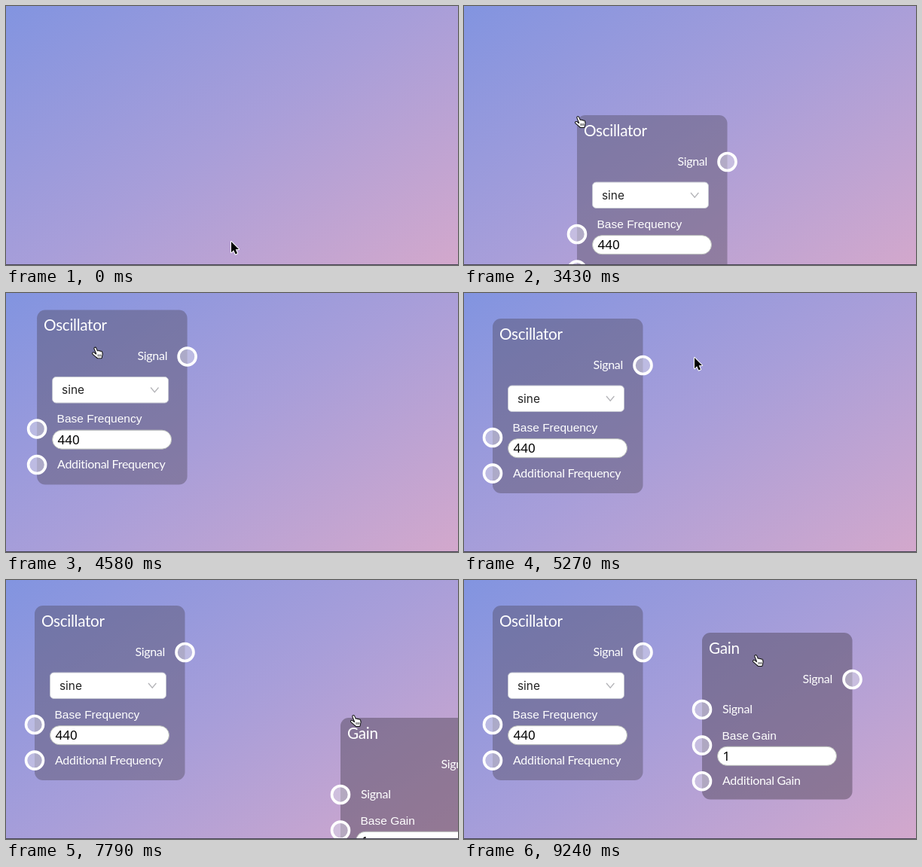
Animation, 600 px wide and 344 px high, one loop 9.39 s. Source, as an HTML page with a canvas:

```html
<!DOCTYPE html>
<html lang="en">
<head>
<meta charset="utf-8">
<title>Node editor</title>
<style>
html, body { margin: 0; width: 100%; height: 100%; overflow: hidden; }
canvas { display: block; width: 600px; height: 344px; }
</style>
</head>
<body>
<canvas id="stage"></canvas>
<script>
const W = 600, H = 344, LOOP = 9390;
const canvas = document.getElementById('stage');
const ctx = canvas.getContext('2d');
const dpr = window.devicePixelRatio || 1;
canvas.width = W * dpr;
canvas.height = H * dpr;

const ROUND = 'Lato, sans-serif';
const PLAIN = '"Liberation Sans", Arial, sans-serif';
const FIELD = '"Noto Sans", sans-serif';
const UI = 'Inter, sans-serif';
const ROW = 24, HEAD = 28, MENU_W = 169, NODE_W = 199.5, PITCH = 47.6;

// The pointer leaves at start, arrives at end; everything else follows it.
const home = { x: 299, y: 313 };
const moves = [
  { start: 150, end: 390, x: 120, y: 86 },
  { start: 2060, end: 2980, x: 150, y: 145 },
  { start: 3100, end: 3430, x: 151, y: 147 },
  { start: 3430, end: 3880, x: 227, y: 195 },
  { start: 3930, end: 4210, x: 122, y: 58 },
  { start: 4210, end: 4900, x: 115, y: 84 },
  { start: 4970, end: 5240, x: 306, y: 86 },
  { start: 5640, end: 6050, x: 344, y: 191 },
  { start: 6050, end: 6760, x: 444, y: 183 },
  { start: 6970, end: 7640, x: 461, y: 180 },
  { start: 7790, end: 8060, x: 515, y: 213 },
  { start: 8060, end: 8620, x: 387, y: 100 }
];
const menus = [
  { from: 750, to: 3090 },
  { from: 5400, to: 6960, subFrom: 6020 }
];
const items = ['Constant', 'Oscillator', 'Noise', 'Processors', 'Notes', 'Keyboard Input', 'Outputs'];
const nodes = [
  {
    title: 'Oscillator', h: 232, fill: 'rgba(75,68,85,0.4)',
    from: 3090, grab: 3930, drop: 4900,
    select: 'sine', firstPort: 158, value: '440',
    inputs: ['Base Frequency', 'Additional Frequency']
  },
  {
    title: 'Gain', h: 221.5, fill: 'rgba(75,65,82,0.46)',
    from: 6960, grab: 8060, drop: 8620,
    firstPort: 102, value: '1',
    inputs: ['Signal', 'Base Gain', 'Additional Gain']
  }
];

const clamp = (v, lo, hi) => Math.min(hi, Math.max(lo, v));

function pointerAt(t) {
  let { x, y } = home;
  for (const m of moves) {
    const u = clamp((t - m.start) / (m.end - m.start), 0, 1);
    const e = u * u * (3 - 2 * u);
    x += (m.x - x) * e;
    y += (m.y - y) * e;
  }
  return { x, y };
}

// A node appears under the click, then moves by the drag distance.
function nodeAt(n, t) {
  const a = pointerAt(n.from), b = pointerAt(n.grab);
  const c = pointerAt(clamp(t, n.grab, n.drop));
  return { x: a.x + c.x - b.x, y: a.y + c.y - b.y };
}

function menuAt(m) {
  const p = pointerAt(m.from);
  return { x: p.x - 48, y: p.y - 8 };
}

function box(x, y, w, h, r, fill, stroke, line = 1) {
  ctx.beginPath();
  ctx.roundRect(x, y, w, h, r);
  if (fill) { ctx.fillStyle = fill; ctx.fill(); }
  if (stroke) { ctx.strokeStyle = stroke; ctx.lineWidth = line; ctx.stroke(); }
}

function text(str, x, y, size, font, fill = '#fff', align = 'left') {
  ctx.font = `${size}px ${font}`;
  ctx.letterSpacing = font === ROUND ? '-0.3px' : '0px';
  ctx.textAlign = align;
  ctx.fillStyle = fill;
  ctx.fillText(str, x, y);
}

function drawBackground() {
  const dx = 0.65, dy = 1;
  const k = (dx * W + dy * H) / (dx * dx + dy * dy);
  const g = ctx.createLinearGradient(0, 0, dx * k, dy * k);
  g.addColorStop(0, 'rgb(130,148,224)');
  g.addColorStop(0.5, 'rgb(168,158,217)');
  g.addColorStop(1, 'rgb(211,168,204)');
  ctx.fillStyle = g;
  ctx.fillRect(0, 0, W, H);
}

function drawPort(x, y) {
  ctx.beginPath();
  ctx.arc(x, y, 11.5, 0, Math.PI * 2);
  ctx.fillStyle = 'rgba(222,220,234,0.5)';
  ctx.fill();
  ctx.strokeStyle = '#fff';
  ctx.lineWidth = 3.6;
  ctx.stroke();
}

function drawSelect(label) {
  box(20.5, 89, 154, 34.5, 5, '#fff', '#c3c5d0');
  text(label, 33, 111.5, 15.4, UI, '#222');
  ctx.beginPath();
  ctx.moveTo(151, 103);
  ctx.lineTo(156.2, 109.2);
  ctx.lineTo(161.4, 103);
  ctx.strokeStyle = '#b4b4b8';
  ctx.lineWidth = 1.3;
  ctx.stroke();
}

function drawInput(label, y, value) {
  drawPort(0, y);
  if (!label.startsWith('Base')) {
    text(label, 27, y + 5, 16, ROUND);
    return;
  }
  text(label, 26.5, y - 8, 15.5, PLAIN);
  box(20.5, y + 1.7, 158, 25, 12.5, '#fff', '#b8bcb8');
  text(value, 27.5, y + 20.2, 17, FIELD, '#000');
}

function drawNode(n, t) {
  const { x, y } = nodeAt(n, t);
  ctx.save();
  ctx.translate(x, y);
  box(0, 0, NODE_W, n.h, 11, n.fill);
  text(n.title, 9, 28, 20.7, ROUND);
  text('Signal', 173, 67, 16, ROUND, '#fff', 'right');
  drawPort(NODE_W, 62);
  if (n.select) drawSelect(n.select);
  n.inputs.forEach((label, i) => drawInput(label, n.firstPort + i * PITCH, n.value));
  ctx.restore();
}

function drawRow(label, x, y, selected, last, arrow) {
  ctx.font = `13.6px ${PLAIN}`;
  ctx.letterSpacing = '0px';
  if (selected) {
    ctx.fillStyle = '#6992c8';
    ctx.fillRect(x + 4, y + 4.5, ctx.measureText(label).width + (last ? 0 : 3.5), 15.5);
  }
  text(label, x + 4, y + 17, 13.6, PLAIN);
  if (!arrow) return;
  ctx.beginPath();
  ctx.moveTo(x + 153, y + 7.5);
  ctx.lineTo(x + 162.5, y + 12);
  ctx.lineTo(x + 153, y + 16.5);
  ctx.fillStyle = '#bab9c0';
  ctx.fill();
}

function drawMenu(m, t) {
  const { x, y } = menuAt(m);
  const body = 'rgba(98,96,107,0.93)';
  box(x, y, MENU_W, HEAD + items.length * ROW - 0.5, 5, body);
  box(x, y, MENU_W, HEAD, [5, 5, 0, 0], 'rgba(148,142,172,0.85)');
  box(x + 4.5, y + 3.5, 160.5, 19.5, 9.7, '#868298', '#fff', 1.5);
  items.forEach((label, i) => {
    const top = y + HEAD + i * ROW;
    ctx.fillStyle = '#484652';
    ctx.fillRect(x, top, MENU_W, 1);
    drawRow(label, x, top, true, i === items.length - 1, i > 2);
  });
  if (t >= m.subFrom) {
    const top = y + HEAD + 3 * ROW;
    box(x + MENU_W + 1, top, MENU_W, ROW, 4, body);
    drawRow('Gain', x + MENU_W + 1, top);
  }
}

function drawArrow() {
  const p = new Path2D('M0 0V14.2L3.2 11.2L5.6 16.6L8 15.5L5.7 10.3L10 10.1Z');
  ctx.strokeStyle = '#fff';
  ctx.lineWidth = 2;
  ctx.lineJoin = 'round';
  ctx.stroke(p);
  ctx.fillStyle = '#000';
  ctx.fill(p);
}

function drawBeam() {
  ctx.translate(0, 1);
  ctx.beginPath();
  for (const s of [-1, 1]) {
    ctx.moveTo(-3, s * 7);
    ctx.quadraticCurveTo(0, s * 7, 0, s * 5);
    ctx.quadraticCurveTo(0, s * 7, 3, s * 7);
  }
  ctx.moveTo(0, -5.5);
  ctx.lineTo(0, 5.5);
  ctx.moveTo(-2, 2.5);
  ctx.lineTo(2, 2.5);
  for (const [color, width] of [['#fff', 3], ['#111', 1.3]]) {
    ctx.strokeStyle = color;
    ctx.lineWidth = width;
    ctx.stroke();
  }
}

function drawHand() {
  ctx.lineCap = 'round';
  ctx.lineJoin = 'round';
  // Thick strokes for index finger, thumb and knuckles around a palm.
  const fingers = new Path2D('M0.3 1.2L3.6 9M-2 7.8L2.4 11.6');
  for (let i = 0; i < 3; i++) {
    fingers.moveTo(4.2 + i * 2, 5.4 + i * 0.5);
    fingers.lineTo(4.6 + i * 1.8, 10);
  }
  const palm = new Path2D('M3 8H9L8.2 13.4H3.6L1.6 10.6Z');
  for (const [color, grow] of [['#111', 2], ['#fff', 0]]) {
    ctx.strokeStyle = ctx.fillStyle = color;
    ctx.lineWidth = 2 + grow;
    ctx.stroke(fingers);
    ctx.lineWidth = 1 + grow;
    ctx.stroke(palm);
    ctx.fill(palm);
  }
  ctx.fillStyle = '#222';
  for (let i = 0; i < 3; i++) ctx.fillRect(3.6 + i * 1.9, 9, 0.8, 3);
}

function cursorShape(p, t, menu) {
  if (menu) return p.y < menuAt(menu).y + HEAD ? drawBeam : drawHand;
  const over = nodes.some(n => {
    const { x, y } = nodeAt(n, t);
    return t >= n.from && p.x > x - 4 && p.x < x + NODE_W && p.y > y - 4 && p.y < y + n.h;
  });
  return over ? drawHand : drawArrow;
}

function draw(t) {
  ctx.setTransform(dpr, 0, 0, dpr, 0, 0);
  drawBackground();
  nodes.forEach(n => { if (t >= n.from) drawNode(n, t); });
  const menu = menus.find(m => t >= m.from && t < m.to);
  if (menu) drawMenu(menu, t);
  ctx.fillStyle = '#4b4858';
  ctx.fillRect(0, H - 1, W, 1);
  const p = pointerAt(t);
  ctx.save();
  ctx.translate(p.x, p.y);
  cursorShape(p, t, menu)();
  ctx.restore();
}

const start = performance.now();
function tick() {
  draw((performance.now() - start) % LOOP);
  requestAnimationFrame(tick);
}
tick();
</script>
</body>
</html>
```
